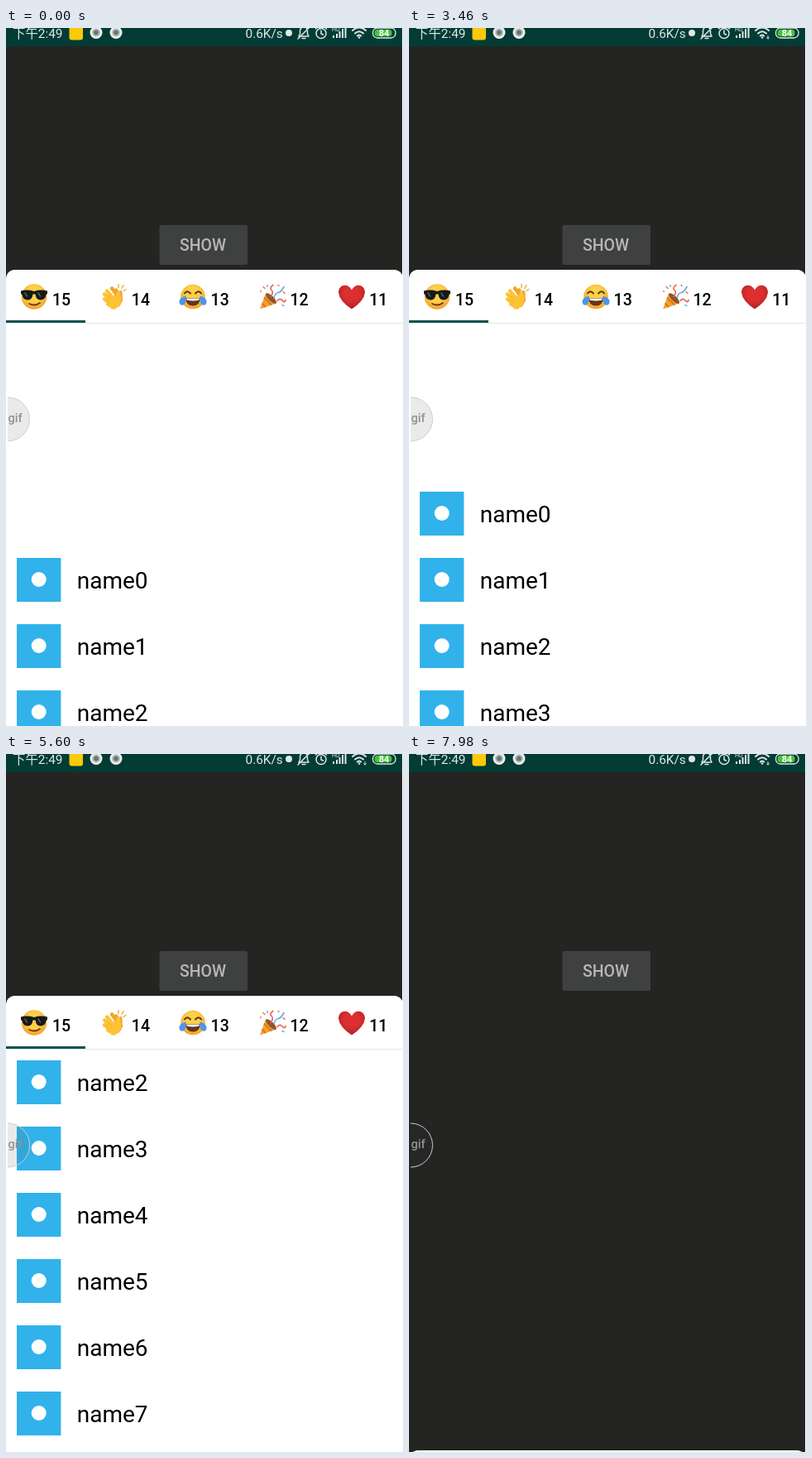
These frames come from a looping animation (480x843 px, 8 s). An HTML page:

```html
<!DOCTYPE html>
<html lang="zh">
<head>
<meta charset="utf-8">
<title>Reactions sheet</title>
<style>
  html, body { margin: 0; width: 100%; height: 100%; overflow: hidden; background: #242423; }
  svg { display: block; width: 100%; height: 100%; font-family: Roboto, "Noto Sans", sans-serif; }
  .status text { font-family: Roboto, "Noto Sans CJK SC", "Noto Sans CJK", sans-serif; }
  .line { fill: none; stroke-linecap: round; stroke-linejoin: round; }
</style>
</head>
<body>
<svg viewBox="0 0 480 843">
  <defs>
    <radialGradient id="face" cy=".4" r=".62">
      <stop offset=".5" stop-color="#fdd047"/><stop offset="1" stop-color="#f39b27"/>
    </radialGradient>
    <radialGradient id="red" cy=".35" r=".7">
      <stop offset=".4" stop-color="#dc3030"/><stop offset="1" stop-color="#a91f24"/>
    </radialGradient>
    <radialGradient id="dot">
      <stop offset=".25" stop-color="#66736f"/><stop offset=".75" stop-color="#eef2f0"/>
    </radialGradient>

    <g id="cool">
      <circle r="15.3" fill="url(#face)"/>
      <path d="M-16-7Q-8-9 0-6.500Q8-9 16-7V-3.500L14.500-2.500Q13.500 4 7.500 4Q2.500 4 1.500-3H-1.500Q-2.500 4-7.500 4Q-13.500 4-14.500-2.500L-16-3.500Z" fill="#16191b"/>
      <path class="line" d="M-11-4.500L-8.500-.5M5-4.500L7.500-.5" stroke="#68747a" stroke-width="1.300"/>
      <path class="line" d="M-6 8.500Q1 12 7 7.500" stroke="#6b3b12" stroke-width="1.800"/>
    </g>

    <g id="clap">
      <path class="line" d="M-2-10L7 2M3-8L9 4" stroke="#f2a52c" stroke-width="4.500"/>
      <path d="M1-3L9-8Q11.500-6 10.500 3Q10 10 5 13L0 6Z" fill="#f2a52c"/>
      <path class="line" d="M-8-7L2 5M-11-3L0 8M-11 3L0 11M-7 9L1 13" stroke="#fdc334" stroke-width="4.300"/>
      <path d="M-6 2L3-2Q4-8 7-7Q11 3 8 9Q4 15.500-3 15Z" fill="#fdc334"/>
      <path class="line" d="M-8-2L-2 4M-9 3.500L-4 8" stroke="#e9a92f" stroke-width=".8"/>
      <path class="line" d="M6-11V-15M10-10L12-14M12-7L15-9" stroke="#e9b04a" stroke-width="1.500"/>
    </g>

    <g id="joy">
      <circle r="14.800" fill="url(#face)"/>
      <path class="line" d="M-10-4Q-7-8.500-3-4M3-4Q7-8.500 10-4" stroke="#5d3415" stroke-width="2"/>
      <path d="M-9 1.500H9Q8.500 11 0 11Q-8.500 11-9 1.500Z" fill="#65351a"/>
      <path d="M-8 2H8L7 4.300Q0 5.500-7 4.300Z" fill="#fff"/>
      <path id="tear" d="M-8.500-1Q-17 1-16.500 7Q-15 12-10.500 9.500Q-7.500 6-8.500-1Z" fill="#4f94ea"/>
      <use href="#tear" transform="scale(-1 1)"/>
    </g>

    <g id="party">
      <path d="M-15 15L-8-4Q2-2 5 8Z" fill="#f3a127"/>
      <path d="M-12.500 8L-8 12.500M-10 1L-1 10" stroke="#d9772a" stroke-width="2"/>
      <ellipse cx="-1.500" cy="2" rx="8.500" ry="3" transform="rotate(44 -1.500 2)" fill="#8f5331"/>
      <g class="line" stroke-width="1.600">
        <path d="M-2 0Q2-5-1-8T1-14M6 5Q9 1 12 4.500T16 4" stroke="#ea6149"/>
        <path d="M2 1Q4-5 7-5T14-12" stroke="#5aace2"/>
        <path d="M-11-12L-9-10M7-14L8-13M13-6L15-4M-14-7V-6" stroke="#ef7a55"/>
        <path d="M-6-14V-12M12 10L14 11" stroke="#6bb7ea"/>
      </g>
    </g>

    <path id="heart" d="M0 15Q-15 5-16-5C-16-15-4-17 0-8C4-17 16-15 16-5Q15 5 0 15Z" fill="url(#red)"/>

    <g id="tile">
      <rect width="53.400" height="53" fill="#31b2ea"/>
      <circle cx="26.700" cy="26" r="9" fill="#fff"/>
    </g>
  </defs>

  <rect width="480" height="843" fill="#242423"/>
  <rect x="185.500" y="238" width="106.500" height="48" rx="2.500" fill="#3e413f"/>
  <text x="210" y="269.300" font-size="19.400" font-weight="500" fill="#b9b7b8">SHOW</text>

  <g class="status">
    <rect width="480" height="22" fill="#033c35"/>
    <g fill="#dfe8e5" font-size="15.400">
      <text x="8" y="12">下午2:49</text>
      <text x="289.500" y="12">0.6K/s</text>
      <text x="394" y="3.500" font-size="7">HD</text>
      <circle cx="342" cy="6" r="4"/>
      <path d="M395 12V9h2v3zM399 12V7h2v5zM402.500 12V4h2v8zM406 12V1h2v11zM409.500 12V-2h2v14z"/>
    </g>
    <rect x="76.500" y="-2" width="16.500" height="16.500" rx="3" fill="#fbca08"/>
    <circle cx="109" cy="5.500" r="7.500" fill="url(#dot)"/>
    <circle cx="133" cy="5.500" r="7.500" fill="url(#dot)"/>
    <g class="line" stroke="#dfe8e5" stroke-width="1.500">
      <path d="M354 10H366L364.500 7V3Q364-1 360-1Q356-1 355.500 3V7ZM358 12.500H362M353 13L367-1"/>
      <circle cx="381" cy="6.500" r="6"/>
      <path d="M381 3V7L383.500 8M374.500 1L377-1M387.500 1L385-1"/>
      <path d="M419 3Q427-4 435 3M422 6.500Q427 2 432 6.500M424.800 9.500Q427 7.500 429.200 9.500" stroke-width="1.900"/>
      <circle cx="427" cy="11.500" r=".6"/>
      <path id="tick" d="M434 9.500V13M432.700 11.800L434 13L435.300 11.800" stroke-width="1"/>
      <rect x="443.500" y="0" width="27.500" height="12" rx="5.500" stroke-width="1.300"/>
    </g>
    <rect x="445.500" y="1.800" width="21" height="8.400" rx="3.800" fill="#45c43a"/>
    <text x="457" y="10" font-size="11" font-weight="700" text-anchor="middle" fill="#fff">84</text>
  </g>

  <g id="sheet">
    <path d="M0 850V305Q0 292 13 292H467Q480 292 480 305V850Z" fill="#fff"/>
    <g id="rows" font-size="28"></g>
    <path d="M0 357V305Q0 292 13 292H467Q480 292 480 305V357Z" fill="#fff"/>
    <rect y="356" width="480" height="1" fill="#e5e7d5"/>
    <rect y="353" width="96" height="3" fill="#0b5254"/>
    <g id="tabs" font-size="19.500" font-weight="500"></g>
  </g>

  <path d="M2 446A26.500 26.500 0 0 1 2 499Z" fill="#3c443f" fill-opacity=".11"/>
  <path d="M2 446A26.500 26.500 0 0 1 2 499" fill="none" stroke="#cfcfc9" stroke-width="1"/>
  <text x="2.500" y="476" font-size="14.500" font-weight="500" fill="#929292">gif</text>
  <rect x="479" width="1" height="843" fill="#fff"/>
</svg>
<script>
const LOOP = 8000, ROW = 80, COUNT = 15;
const $ = id => document.getElementById(id);

$('tabs').innerHTML = ['cool', 'clap', 'joy', 'party', 'heart'].map((icon, i) =>
  `<use href="#${icon}" x="${34 + 96 * i}" y="324.5"/><text x="${56 + 95.8 * i}" y="334.5">${15 - i}</text>`
).join('');

$('rows').innerHTML = Array.from({ length: COUNT }, (_, i) =>
  `<g><use href="#tile" x="13"/><text x="85.700" y="37.300">name${i}</text></g>`
).join('');
const rows = [...$('rows').children];

const linear = u => u;
const easeOut = u => 1 - (1 - u) ** 2;
const easeIn = u => u ** 1.615;

// Drag gestures: start, end, steps, first and last position of the list, easing
const drags = [
  [2660, 3460, 9, 635, 560, linear],
  [3560, 4280, 9, 553, 451, linear],
  [4380, 4850, 6, 415, 282, easeOut],
  [5320, 6080, 9, 272, -30, easeIn],
  [6180, 6180, 1, -36, -36, linear],
  [6490, 6650, 3, -45, -74, linear]
];
const drops = [[7590, 14], [7690, 60], [7790, 205], [7880, 415], [7980, 549]];

function listTop(t) {
  let y = 640;
  for (const [start, end, steps, from, to, ease] of drags) {
    if (t < start) break;
    const last = steps - 1;
    const step = last ? Math.min(last, Math.floor((t - start) / (end - start) * last + 0.1)) : 0;
    y = from + (to - from) * ease(last ? step / last : 1);
  }
  return Math.round(y);
}

function sheetDrop(t) {
  return drops.reduce((y, [at, value]) => t >= at ? value : y, 0);
}

function draw(t) {
  const top = listTop(t);
  rows.forEach((row, i) => {
    const y = top + i * ROW;
    row.setAttribute('transform', `translate(0 ${y})`);
    row.setAttribute('visibility', y > 303 && y < 843 ? 'visible' : 'hidden');
  });
  $('sheet').setAttribute('transform', `translate(0 ${sheetDrop(t)})`);
  $('tick').setAttribute('visibility', t >= 470 ? 'visible' : 'hidden');
}

const begin = performance.now();
function tick() {
  draw((performance.now() - begin) % LOOP);
  requestAnimationFrame(tick);
}
tick();
</script>
</body>
</html>
```
